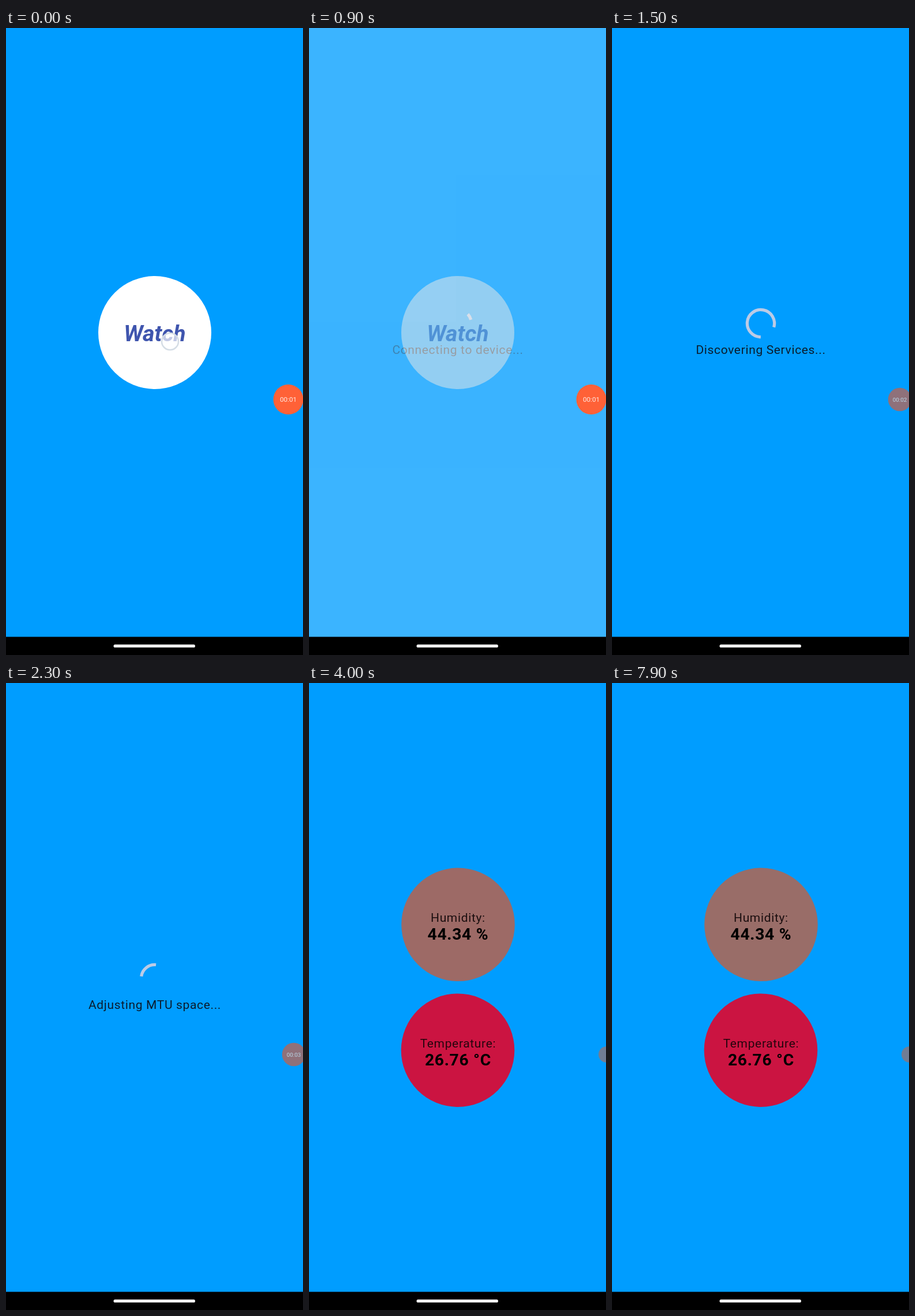
These frames come from a looping animation (515x1087 px, 8000 ms). An HTML page:

```html
<!DOCTYPE html>
<html lang="en">
<head>
<meta charset="utf-8">
<title>Watch sensor</title>
<style>
  html, body { margin: 0; width: 100%; height: 100%; overflow: hidden; background: #fff; }
  svg { display: block; width: 100vw; height: 100vh; }
  text { font-family: Roboto, sans-serif; text-anchor: middle; }
  .label { font-size: 21px; letter-spacing: .65px; }
  .value { font-size: 28.3px; font-weight: 700; letter-spacing: .65px; }
</style>
</head>
<body>
<svg viewBox="0 0 515 1087">
  <defs>
    <clipPath id="disc"><circle cx="258" cy="528" r="98"/></clipPath>
  </defs>
  <rect width="515" height="1087" fill="#fff"/>

  <g id="start">
    <rect width="515" height="1056" fill="#009dff"/>
    <circle cx="258" cy="528" r="98" fill="#fff"/>
    <text x="258" y="542.5" font-size="39.4" font-weight="700" font-style="italic" fill="#3f55ae">Watch</text>
    <circle id="ripple" cx="284.5" cy="543.5" fill="#000" fill-opacity=".12" clip-path="url(#disc)"/>
    <circle id="touch" cx="284.5" cy="543.5" r="14.5" fill="#fff" fill-opacity=".68" stroke="#d5dde5" stroke-width="2.5"/>
  </g>

  <g id="loader">
    <rect width="515" height="1056" fill="#009dff"/>
    <path id="arc" fill="none" stroke="#bccbe6" stroke-width="5.25"/>
    <text id="status" class="label" x="258" y="565" fill="#0b1c2e"></text>
  </g>

  <g id="readings">
    <rect width="515" height="1056" fill="#009dff"/>
    <circle id="damp" cx="258.5" cy="418.8" r="98.3"/>
    <text class="label" x="258.4" y="413.5" fill="#1c0f10">Humidity:</text>
    <text class="value" x="258.4" y="445">44.34 %</text>
    <circle cx="258" cy="636.7" r="98.3" fill="#cb1441"/>
    <text class="label" x="258.4" y="631.5" fill="#26050d">Temperature:</text>
    <text class="value" x="258.4" y="663">26.76 °C</text>
  </g>

  <circle id="bubble" cy="644"/>
  <text id="clock"></text>

  <rect y="1055.5" width="515" height="31.5" fill="#000"/>
  <rect x="186.5" y="1068.7" width="141.5" height="5.4" rx="2.7" fill="#f0f0f0"/>
</svg>
<script>
const LOOP = 8000, STEP = 100;
const el = {};
document.querySelectorAll('[id]').forEach(n => el[n.id] = n);

const set = (node, attrs) => {
  for (const k in attrs) node.setAttribute(k, attrs[k]);
};
const show = (node, on) => node.style.display = on ? '' : 'none';
const mix = (a, b, k) => a + (b - a) * k;
const ramp = (t, from, to) => Math.min(1, Math.max(0, (t - from) / (to - from)));
const rgb = (a, b, k) => `rgb(${a.map((v, i) => Math.round(mix(v, b[i], k)))})`;

// cubic-bezier(.4, 0, .2, 1), solved by bisection
function ease(x) {
  let lo = 0, hi = 1;
  for (let i = 0; i < 24; i++) {
    const s = (lo + hi) / 2, r = 1 - s;
    if (1.2 * s * r * r + .6 * s * s * r + s ** 3 < x) lo = s; else hi = s;
  }
  return lo * lo * (3 - 2 * lo);
}

function point(deg) {
  const a = deg * Math.PI / 180;
  return (258 + 23.6 * Math.cos(a)).toFixed(2) + ' ' + (512 + 23.6 * Math.sin(a)).toFixed(2);
}

// Indeterminate ring: the head runs ahead, then the tail catches up
function drawArc(t) {
  const turn = 1332, age = Math.max(0, t - 785);
  const phase = age % turn, lap = Math.floor(age / turn);
  const head = 290 * ease(ramp(phase, 0, turn / 2));
  const tail = 290 * ease(ramp(phase, turn / 2, turn));
  const base = lap * 216 + phase / turn * 286 - 67;
  const large = head - tail > 180 ? 1 : 0;
  set(el.arc, { d: `M${point(base + tail)}A23.6 23.6 0 ${large} 1 ${point(base + head)}` });
}

function drawBubble(t) {
  const size = ramp(t, 900, 1100), tucked = t >= 4000;
  const x = mix(489.5, 499, size);
  set(el.bubble, {
    cx: tucked ? 516 : x,
    r: tucked ? 14 : mix(26, 20.3, size),
    fill: tucked ? '#717d94' : rgb([255, 97, 55], [143, 113, 122], ramp(t, 900, 1200))
  });
  show(el.clock, !tucked);
  set(el.clock, {
    x, y: mix(648.3, 647.6, size),
    'font-size': mix(11.7, 9.8, size),
    fill: rgb([255, 236, 230], [186, 217, 234], size)
  });
  el.clock.textContent = '00:0' + (1 + Math.floor(t / 1000));
}

function draw(t) {
  const fade = ease(ramp(t, 690, 1390));
  show(el.start, fade < 1);
  show(el.loader, fade > 0 && t < 3300);
  show(el.readings, t >= 3300);
  el.start.style.opacity = 1 - fade;
  el.loader.style.opacity = fade;
  set(el.ripple, { r: 150 * ramp(t, 400, 700) * (t >= 500) });
  show(el.touch, t < 700);
  el.status.textContent = t < 1400 ? 'Connecting to device...'
    : t < 2300 ? 'Discovering Services...' : 'Adjusting MTU space...';
  set(el.damp, { fill: rgb([157, 106, 102], [153, 109, 104], ramp(t, 7400, 7900)) });
  drawArc(t);
  drawBubble(t);
}

const begin = performance.now();
function tick() {
  const t = (performance.now() - begin) % LOOP;
  draw(Math.floor(t / STEP) * STEP);
  requestAnimationFrame(tick);
}
tick();
</script>
</body>
</html>
```
